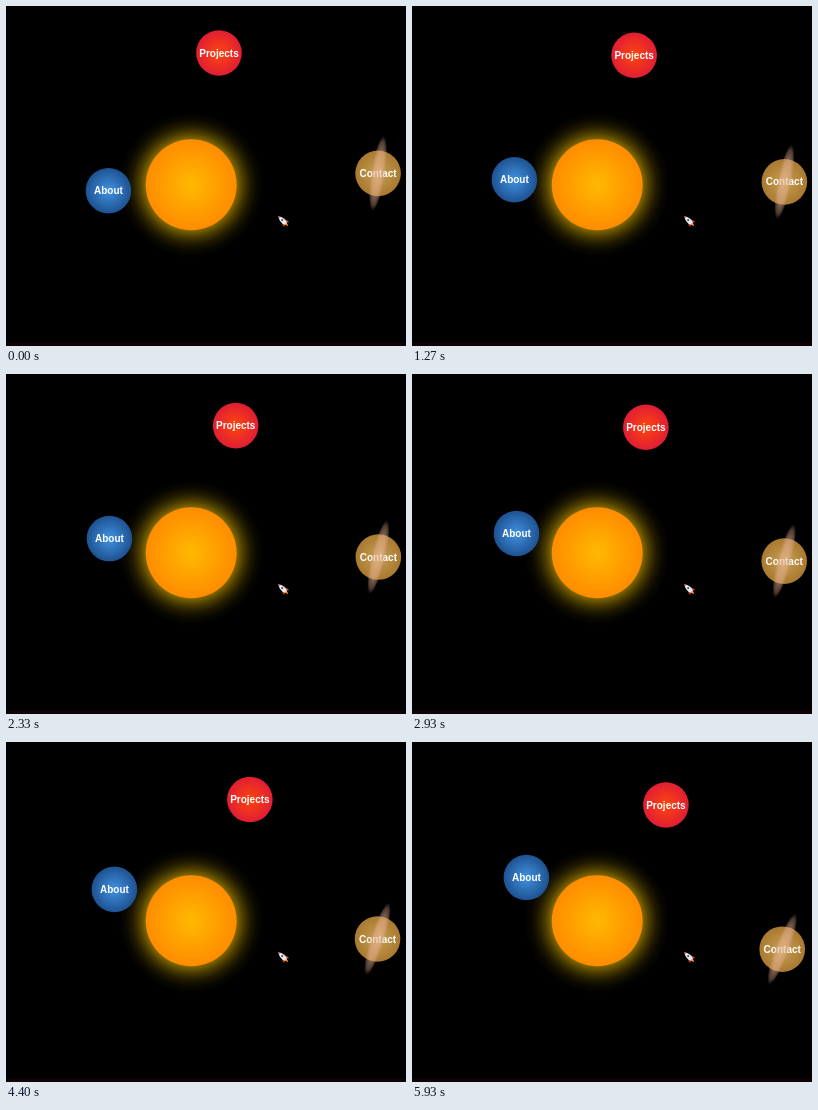
Write an HTML page with a canvas that moves like this. It is 400 px wide and 340 px high and loops after 6000 ms.

```html
<!DOCTYPE html>
<html lang="en">
<head>
<meta charset="utf-8">
<title>Solar menu</title>
<style>
  html, body { margin: 0; width: 100%; height: 100%; overflow: hidden; background: #000; }
  canvas { display: block; width: 400px; height: 340px; }
</style>
</head>
<body>
<canvas id="stage" width="400" height="340"></canvas>
<script>
const ctx = document.getElementById('stage').getContext('2d');
const LOOP = 6000;
const FPS = 15;
const SUN = { x: 185.2, y: 178.8, r: 45.5 };
const PLANET_R = 22.8;

// Angles in degrees, speed in degrees per second.
const planets = [
  { label: 'About', orbit: 83, start: 175.9, speed: 5.99, inner: '#4292e2', outer: '#1d5291' },
  { label: 'Projects', orbit: 134.7, start: -78.1, speed: 3.165, inner: '#ff450c', outer: '#e01e34' },
  { label: 'Contact', orbit: 187.2, start: -3.5, speed: 2.06, inner: '#c6a052', outer: '#a97930', ring: true }
];

const rad = deg => deg * Math.PI / 180;

function radial(x, y, r, stops) {
  const g = ctx.createRadialGradient(x, y, 0, x, y, r);
  stops.forEach(([at, color]) => g.addColorStop(at, color));
  return g;
}

function disc(x, y, r, fill) {
  ctx.fillStyle = fill;
  ctx.beginPath();
  ctx.arc(x, y, r, 0, Math.PI * 2);
  ctx.fill();
}

function shape(fill, points) {
  ctx.fillStyle = fill;
  ctx.beginPath();
  points.forEach(([x, y]) => ctx.lineTo(x, y));
  ctx.fill();
}

function drawSun() {
  const { x, y, r } = SUN;
  const reach = r + 27;
  const edge = r / reach;
  const at = k => edge + (1 - edge) * k;
  disc(x, y, reach, radial(x, y, reach, [
    [0, 'rgba(255,205,0,.5)'],
    [edge, 'rgba(255,205,0,.5)'],
    [at(0.25), 'rgba(255,205,0,.29)'],
    [at(0.5), 'rgba(255,205,0,.13)'],
    [at(0.75), 'rgba(255,205,0,.04)'],
    [1, 'rgba(255,205,0,0)']
  ]));
  disc(x, y, r, radial(x, y, r, [[0, '#ffb900'], [0.5, '#ffa200'], [1, '#ff8c00']]));
}

function drawRing(x, y, angle) {
  ctx.save();
  ctx.translate(x, y);
  ctx.rotate(angle);
  ctx.scale(7 / 38, 1);
  disc(0, 0, 38, radial(0, 0, 38, [
    [0, 'rgba(232,186,150,.62)'],
    [0.6, 'rgba(225,175,145,.56)'],
    [0.85, 'rgba(215,160,130,.36)'],
    [1, 'rgba(205,150,120,0)']
  ]));
  ctx.restore();
}

function drawPlanet(p, seconds) {
  const deg = p.start + p.speed * seconds;
  const x = SUN.x + p.orbit * Math.cos(rad(deg));
  const y = SUN.y + p.orbit * Math.sin(rad(deg));
  disc(x, y, PLANET_R, radial(x, y, PLANET_R, [[0, p.inner], [1, p.outer]]));
  ctx.fillStyle = '#fff';
  ctx.fillText(p.label, x, y + 3.6);
  if (p.ring) drawRing(x, y, rad(deg + 12));
}

function drawRocket() {
  ctx.save();
  ctx.translate(277.2, 215);
  ctx.rotate(rad(-45));
  shape('#f5a12c', [[-1.5, 3.5], [1.5, 3.5], [0, 7.2]]);
  shape('#c9362f', [[-1.8, 0], [-3.6, 3], [-3.2, 5], [-1.2, 3.5]]);
  shape('#c9362f', [[1.8, 0], [3.6, 3], [3.2, 5], [1.2, 3.5]]);
  ctx.fillStyle = '#e9e9ee';
  ctx.beginPath();
  ctx.moveTo(0, -6.8);
  ctx.quadraticCurveTo(3.8, -2, 1.6, 3.8);
  ctx.lineTo(-1.6, 3.8);
  ctx.quadraticCurveTo(-3.8, -2, 0, -6.8);
  ctx.fill();
  shape('#d8564c', [[0, -6.8], [1.1, -4.9], [-1.1, -4.9]]);
  disc(0, -1.4, 1.1, '#46617c');
  ctx.restore();
}

function draw(seconds) {
  ctx.fillStyle = '#000';
  ctx.fillRect(0, 0, 400, 340);
  ctx.fillStyle = '#0d0205';
  ctx.fillRect(0, 336, 400, 4);
  ctx.font = 'bold 10px "Liberation Sans", Arial, sans-serif';
  ctx.textAlign = 'center';
  drawSun();
  planets.forEach(p => drawPlanet(p, seconds));
  drawRocket();
}

const begin = performance.now();

function tick() {
  const t = (performance.now() - begin) % LOOP;
  const step = Math.floor(t * FPS / 1000 + 0.06) % (LOOP * FPS / 1000);
  draw(step / FPS);
  requestAnimationFrame(tick);
}
tick();
</script>
</body>
</html>
```
